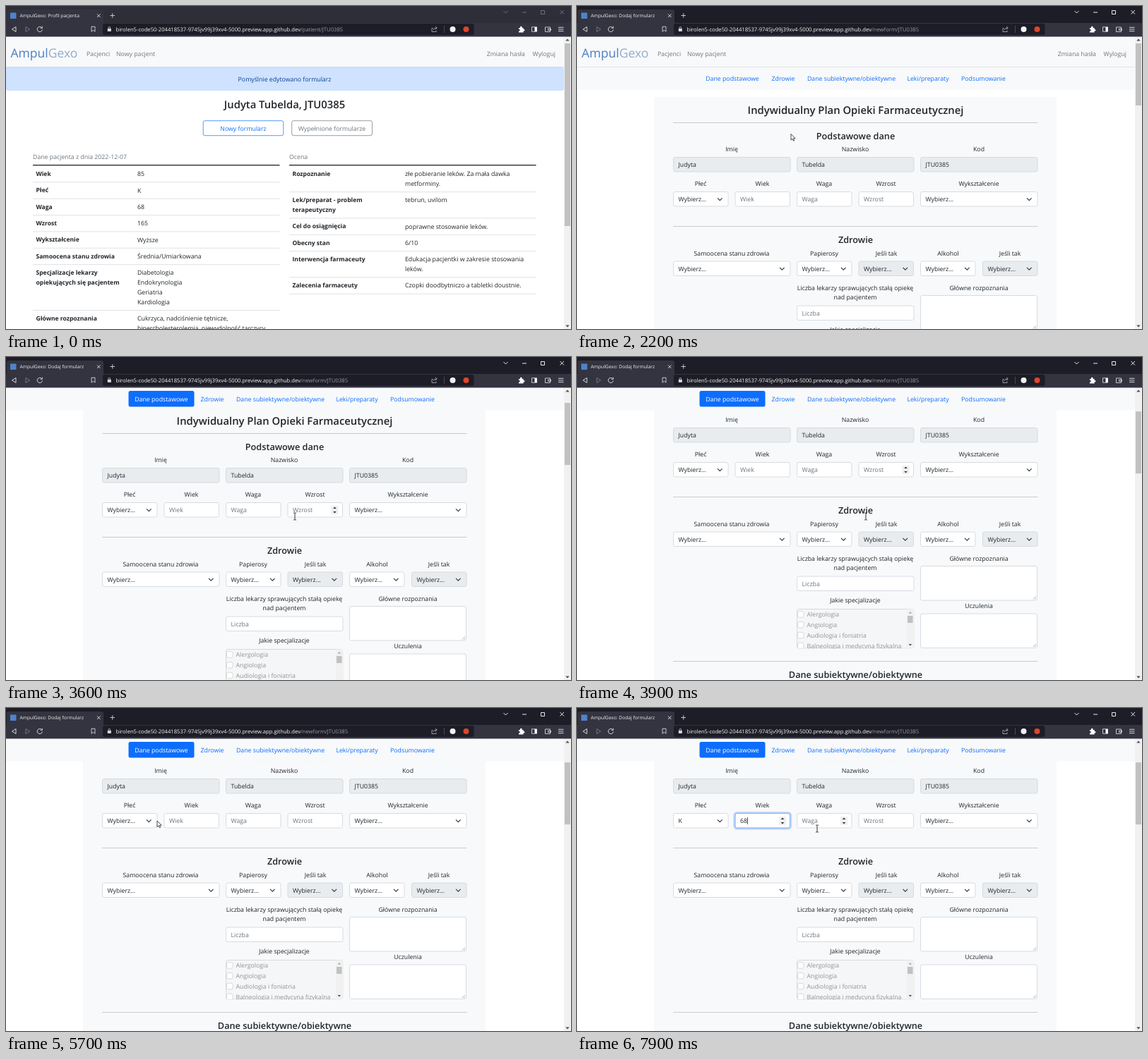
Animation, 800 px wide and 458 px high, one loop 8000 ms. Source, as an HTML page:

```html
<!DOCTYPE html>
<html lang="pl">
<head>
<meta charset="utf-8">
<title>AmpulGexo</title>
<style>
  html, body { margin: 0; width: 100%; height: 100%; overflow: hidden; background: #fff; }
  svg { display: block; }
  text { font-family: "Open Sans", "Noto Sans", sans-serif; text-rendering: geometricPrecision; white-space: pre; }
</style>
</head>
<body>
<svg id="stage" width="800" height="458" viewBox="0 0 800 458"></svg>
<script>
const INK = '#212529', MUTED = '#6c757d', BLUE = '#0d6efd', LINE = '#ced4da', LIGHT = '#f8f9fa';
const CODE = 'JTU0385', FIRST = 'Judyta', LAST = 'Tubelda';

// ---- drawing helpers; text is placed by its vertical middle ----
const text = (x, y, s, { size = 8.75, fill = INK, weight = 400, anchor = 'start', id = '' } = {}) =>
  `<text id="${id}" x="${x}" y="${y + size * .36}" font-size="${size}" fill="${fill}" font-weight="${weight}" text-anchor="${anchor}">${s}</text>`;
const mid = (x, y, s, o) => text(x, y, s, { anchor: 'middle', ...o });
const bold = (x, y, s) => text(x, y, s, { size: 8.55, weight: 700 });
const heading = (y, s, size = 12.7) => mid(394.5, y, s, { size, weight: 600 });
const rect = (x, y, w, h, fill, extra = '') => `<rect x="${x}" y="${y}" width="${w}" height="${h}" fill="${fill}" ${extra}/>`;
const path = (d, stroke, width = 1, fill = 'none', extra = '') =>
  `<path d="${d}" stroke="${stroke}" stroke-width="${width}" fill="${fill}" ${extra}/>`;
const rule = (x, y, w, color = '#dee2e6', h = 1) => rect(x, y, w, h, color);
const group = (id, body, extra = '') => `<g id="${id}" ${extra}>${body}</g>`;

const box = (x, y, w, h = 21.5, fill = '#fff') =>
  rect(x + .5, y + .5, w - 1, h - 1, fill, `stroke="${LINE}" stroke-width=".8" rx="2.5"`);
const input = (x, y, w, label, { fill, color = MUTED, id } = {}) =>
  box(x, y, w, 21.5, fill) + text(x + 7.5, y + 11, label, { fill: color, id });
const select = (x, y, w, { off, id } = {}) =>
  input(x, y, w, 'Wybierz...', { fill: off && '#e9ecef', color: INK, id }) +
  path(`M${x + w - 15.5} ${y + 9.3}l3.3 3.3 3.3-3.3`, '#343a40', 1.2);
const area = (x, y, h) => box(x, y, 166, h) +
  path(`M${x + 160} ${y + h - 2}l4-4M${x + 162.5} ${y + h - 2}l1.5-1.5`, '#777', .6);
const spinner = (id, x, y) => group(id, rect(x - 5, y - 6, 10, 12, '#efefef') +
  path(`M${x - 2.3} ${y - 2}l2.3-2.6 2.3 2.6zM${x - 2.3} ${y + 2}l2.3 2.6 2.3-2.6z`, 'none', 0, '#333'));
const ring = (id, x, y, w) => group(id,
  rect(x - .8, y - .8, w + 1.6, 23.1, 'none', `stroke="${BLUE}" stroke-opacity=".25" stroke-width="2.6" rx="4"`) +
  rect(x + .5, y + .5, w - 1, 20.5, 'none', 'stroke="#86b7fe" rx="2.5"'));

// ---- browser window ----
function browser() {
  const pale = '#d6d6dc';
  return rect(0, 0, 800, 24, '#1c1d26', 'id="frame"') + rect(0, 24, 800, 19.5, '#33343f') +
    path('M1 24V8q0-3 3-3H135q3 0 3 3V24z', 'none', 0, '#33343f') +
    rect(6, 9.5, 8.5, 8.5, '#4f83cc') +
    text(19.5, 13.8, '', { size: 6.7, fill: '#f0f0f2', id: 'title' }) +
    path('M129 11.5l4.5 4.5m0-4.5l-4.5 4.5', '#e4e4e8', .9) +
    path('M147.5 13.5h6.5m-3.25-3.25v6.5', pale, .9) +
    group('controls', path('M704.5 7l3 3 3-3M731 9h6M757.5 6.5h5v5h-5zM784.5 6l5.5 5.5m0-5.5l-5.5 5.5', '#fff', .9)) +
    path('M14 29.5v7l-5.5-3.5z', pale, 1) + path('M28 29.5v7l5.5-3.5z', '#74757f', 1) +
    path('M50.5 30.6a3.6 3.6 0 1 0 .9 3M51.3 28.8v2.6h-2.6', pale, 1) +
    path('M121 29.3h5v7l-2.5-2-2.5 2z', pale, .9) +
    rect(137, 25, 525.5, 16, '#1c1d26', 'rx="2.5"') +
    rect(143.8, 32, 5, 4, pale) + path('M145 32v-1.2a1.3 1.3 0 0 1 2.6 0V32', pale, .8) +
    `<text x="155.5" y="35.8" font-size="7.65" fill="#f4f4f6">birolen5-code50-204418537-9745jv99j39xv4-5000.preview.app.github.dev<tspan id="route" fill="#9a9ba5"></tspan></text>` +
    path('M604.5 31.5h-1.5v5h6v-2M605 34q.5-3 5-3m-2-2l2.3 2-2.3 2', '#b9bac2', .8) +
    rect(620, 28, .8, 10, '#55565f') +
    '<circle cx="632.5" cy="33" r="4" fill="#f2f2f4"/><circle cx="651.5" cy="33" r="4" fill="#e0452b"/>' +
    path('M726 31h2v-1a1.3 1.3 0 0 1 2.6 0v1h2v2h.6a1.3 1.3 0 0 1 0 2.6h-.6V37.5H726v-2h.6a1.2 1.2 0 0 0 0-2.4H726z', 'none', 0, '#fff') +
    path('M744.5 29.8h7v6.5h-7z', pale, .9) + rect(748.5, 30, 3, 6, '#fff') +
    path('M763.5 30h7v6.5h-7zM767.5 32.2h4v2.2h-4z', pale, .9) +
    path('M782 30.3h7.5m-7.5 2.7h7.5m-7.5 2.7h7.5', pale, 1);
}

const scrollbar = () => rect(790, 43.5, 10, 415, '#f1f1f1') +
  path('M792.3 49.5l2.7-3 2.7 3zM792.3 452.5l2.7 3 2.7-3z', 'none', 0, '#505050') +
  rect(791, 53, 8, 88, '#c1c1c1', 'id="thumb"');

function navbar() {
  const fill = '#737577';
  return rect(0, 43, 790, 43, LIGHT) + rule(0, 86, 790, '#e3e5e7') +
    `<text x="6.5" y="73" font-size="17.5" fill="#4d7fc4">Ampul<tspan fill="#93abce">Gexo</tspan></text>` +
    text(114, 68, 'Pacjenci', { fill }) + text(156, 68, 'Nowy pacjent', { fill }) +
    text(735, 68, 'Zmiana hasła', { fill, anchor: 'end' }) + text(778, 68, 'Wyloguj', { fill, anchor: 'end' });
}

// ---- patient profile ----
function table(x, valueX, caption, rows) {
  let y = 226, out = text(x, 214, caption, { fill: MUTED }) + rule(x, 225, 349.5, INK, 1.3);
  for (const [name, value] of rows) {
    const names = name.split('|'), values = value.split('|');
    names.forEach((s, i) => out += bold(x + 4.5, y + 12 + i * 13.9, s));
    values.forEach((s, i) => out += text(valueX, y + 12 + i * 13.9, s));
    y += 9.5 + 13.85 * Math.max(names.length, values.length);
    out += rule(x, y, 349.5);
  }
  return out;
}

const profile = () => rect(0, 43, 790, 415, '#fff') + navbar() +
  rect(.3, 86.8, 789.2, 32.7, '#cfe2ff', 'stroke="#b6d4fe" stroke-width=".6" rx="2.5"') +
  mid(394.5, 103.5, 'Pomyślnie edytowano formularz', { fill: '#084298' }) +
  heading(139.5, `${FIRST} ${LAST}, ${CODE}`, 14.8) +
  rect(279.2, 162.7, 113.6, 21, '#fff', `id="newButton" stroke="${BLUE}" stroke-width=".7" rx="2.5"`) +
  mid(336, 173.5, 'Nowy formularz', { id: 'newLabel' }) +
  rect(404.7, 162.7, 113.8, 21, '#fff', `stroke="${MUTED}" stroke-width=".7" rx="2.5"`) +
  mid(461.5, 173.5, 'Wypełnione formularze', { fill: MUTED }) +
  table(38, 186, 'Dane pacjenta z dnia 2022-12-07', [
    ['Wiek', '85'], ['Płeć', 'K'], ['Waga', '68'], ['Wzrost', '165'], ['Wykształcenie', 'Wyższe'],
    ['Samoocena stanu zdrowia', 'Średnia/Umiarkowana'],
    ['Specjalizacje lekarzy|opiekujących się pacjentem', 'Diabetologia|Endokrynologia|Geriatria|Kardiologia'],
    ['Główne rozpoznania', 'Cukrzyca, nadciśnienie tętnicze,|hipercholesterolemia, niewydolność tarczycy'],
  ]) +
  table(401, 565, 'Ocena', [
    ['Rozpoznanie', 'złe pobieranie leków. Za mała dawka|metforminy.'],
    ['Lek/preparat - problem|terapeutyczny', 'tebrun, uvilom'],
    ['Cel do osiągnięcia', 'poprawne stosowanie leków.'],
    ['Obecny stan', '6/10'],
    ['Interwencja farmaceuty', 'Edukacja pacjentki w zakresie stosowania|leków.'],
    ['Zalecenia farmaceuty', 'Czopki doodbytniczo a tabletki doustnie.'],
  ]);

// ---- new form ----
const labels = (y, list) => list.map(([x, s]) => mid(x, y, s)).join('');

function form() {
  const fixed = { fill: '#e9ecef', color: INK };
  const specialties = ['Alergologia', 'Angiologia', 'Audiologia i foniatria', 'Balneologia i medycyna fizykalna']
    .map((s, i) => {
      const y = 479 + i * 14.8;
      return rect(312.5, y - 4.3, 8.5, 8.5, '#fff', 'stroke="#d3d6d9" stroke-width=".9" rx="2"') +
        text(325.5, y, s, { fill: '#909396' });
    }).join('');
  return rect(109, 129, 570, 600, LIGHT) +
    heading(147.5, 'Indywidualny Plan Opieki Farmaceutycznej', 14.8) + rule(136, 165, 516.5, '#c9cbcd') +
    heading(184.5, 'Podstawowe dane') +
    labels(203, [[219, 'Imię'], [394, 'Nazwisko'], [569, 'Kod']]) +
    input(136, 214, 166.5, FIRST, fixed) + input(311, 214, 166.5, LAST, fixed) + input(486, 214, 166.5, CODE, fixed) +
    labels(252, [[175, 'Płeć'], [262.5, 'Wiek'], [350, 'Waga'], [437.5, 'Wzrost'], [569, 'Wykształcenie']]) +
    select(136, 263, 78.5, { id: 'sex' }) + input(223.5, 263, 78.5, 'Wiek', { id: 'age' }) +
    input(311, 263, 78.5, 'Waga') + input(398.5, 263, 78.5, 'Wzrost') + select(486, 263, 166.5) +
    ring('sexRing', 136, 263, 78.5) + ring('ageRing', 223.5, 263, 78.5) + rect(0, 269, .8, 10, INK, 'id="caret"') +
    spinner('ageSpin', 291, 274) + spinner('weightSpin', 378, 274) + spinner('heightSpin', 465.5, 274) +
    rule(136, 312, 516.5, '#c9cbcd') + heading(331, 'Zdrowie') +
    labels(350.5, [[219, 'Samoocena stanu zdrowia'], [350, 'Papierosy'], [438, 'Jeśli tak'], [525.5, 'Alkohol'], [613, 'Jeśli tak']]) +
    select(136, 361.5, 166.5) + select(311, 361.5, 78.5) + select(398.5, 361.5, 78.5, { off: true }) +
    select(486, 361.5, 78.5) + select(574, 361.5, 78.5, { off: true }) +
    labels(399.5, [[394, 'Liczba lekarzy sprawujących stałą opiekę'], [569, 'Główne rozpoznania']]) +
    mid(394, 413, 'nad pacjentem') + input(311, 424.5, 166.5, 'Liczba') + area(486, 410, 49.5) +
    mid(394, 458.5, 'Jakie specjalizacje') + mid(569, 467, 'Uczulenia') + area(486, 477.5, 49.5) +
    `<svg x="311" y="471" width="166.5" height="56.5" viewBox="311 471 166.5 56.5">` +
    box(311, 471, 166.5, 56.5, '#f5f6f7') + specialties + rect(467, 471.5, 10, 55.5, '#f1f1f1') +
    rect(468, 481, 7.5, 10, '#c1c1c1') +
    path('M469.7 477.5l2.2-2.5 2.2 2.5z', 'none', 0, '#a3a3a3') +
    path('M469.7 521l2.2 2.5 2.2-2.5z', 'none', 0, '#505050') + '</svg>' +
    rule(136, 545, 516.5, '#c9cbcd') + heading(564, 'Dane subiektywne/obiektywne') +
    labels(587.5, [[219, 'Schorzenia oraz dolegliwości pacjenta –']]) +
    mid(219, 601.3, 'o charakterze ostrym i przewlekłym,') + mid(219, 615, 'zarówno aktualne, jak i przeszłe') +
    area(311, 580.5, 60) + area(486, 580.5, 60) +
    text(318.5, 592, 'Dane subiektywne', { fill: MUTED }) + text(493.5, 592, 'Dane obiektywne', { fill: MUTED });
}

const subnav = () => rect(0, 87, 790, 32, LIGHT) +
  rect(173.5, 91.5, 93, 22.5, BLUE, 'id="pill" rx="2.5"') +
  [[220, 'Dane podstawowe'], [292, 'Zdrowie'], [388.5, 'Dane subiektywne/obiektywne'], [497, 'Leki/preparaty'], [575.5, 'Podsumowanie']]
    .map(([x, s], i) => mid(x, 103, s, { fill: BLUE, id: i ? '' : 'firstLink' })).join('');

const pointers = () =>
  group('arrow', path('M0 0v8.6l2-1.8 1.4 3 1.4-.6-1.4-3h2.7z', '#222', .8, '#fff')) +
  group('hand', path('M-1 .8q1-1.4 2 0v4l4 .8q1.2.4 1 2l-.8 4.6h-5.8l-3.2-4.2q-.2-1.6 1.2-1.2l1.6 1.2z', '#222', .9, '#fff')) +
  group('ibeam', path('M-2-5h1.5l.5.5.5-.5H2M-2 5h1.5l.5-.5.5.5H2M0-4.5v9', '#222', .9));

stage.innerHTML =
  group('profilePage', profile()) +
  group('formPage', rect(0, 43, 790, 415, '#fff') +
    group('scroller', navbar() + form()) + group('sticky', subnav())) +
  scrollbar() + browser() + group('pointer', pointers());

// ---- motion ----
const CURSOR = [[300, 806, 386], [1500, 303, 182], [2900, 303, 181], [3400, 409, 226], [3950, 409, 226],
  [4300, 491, 235], [4800, 491, 235], [5600, 214, 160], [5750, 214, 160], [6000, 190, 163], [6300, 175, 184],
  [6450, 175, 184], [6850, 250, 162], [7500, 255, 165], [7900, 340, 171]];
const SCROLL = [[3250, 0], [3400, 57], [3720, 57], [3880, 114], [4050, 114], [4200, 171], [4900, 171], [5050, 114]];

function follow(keys, t) {
  const i = keys.findIndex(k => k[0] > t);
  if (i < 0) return keys.at(-1).slice(1);
  if (i === 0) return keys[0].slice(1);
  const [a, b] = [keys[i - 1], keys[i]];
  const p = (t - a[0]) / (b[0] - a[0]), e = p * p * (3 - 2 * p);
  return a.slice(1).map((v, j) => v + (b[j + 1] - v) * e);
}

const $ = id => document.getElementById(id);
const show = (id, on) => $(id).setAttribute('visibility', on ? 'inherit' : 'hidden');
const set = (id, attrs) => Object.entries(attrs).forEach(([k, v]) => $(id).setAttribute(k, v));
const write = (id, s) => { if ($(id).textContent !== s) $(id).textContent = s; };
const within = (t, a, b = Infinity) => t >= a && t < b;

function draw(t) {
  const onForm = t >= 2100, focused = t >= 1900;
  const [x, y] = follow(CURSOR, t), [scroll] = follow(SCROLL, t);

  show('profilePage', !onForm);
  show('formPage', onForm);
  write('title', 'AmpulGexo: ' + (onForm ? 'Dodaj formularz' : 'Profil pacjenta'));
  write('route', (onForm ? '/newform/' : '/patient/') + CODE);
  set('frame', { fill: focused ? '#1c1d26' : '#2d2e37' });
  set('controls', { opacity: focused ? 1 : .35 });
  set('thumb', onForm ? { y: 53 + scroll * .212, height: 88 } : { y: 53, height: 259 });

  const hover = !onForm && x > 279 && x < 393 && y > 162 && y < 184;
  set('newButton', { fill: hover ? BLUE : '#fff' });
  set('newLabel', { fill: hover ? '#fff' : BLUE });

  set('scroller', { transform: `translate(0 ${-scroll})` });
  set('sticky', { transform: `translate(0 ${-Math.min(scroll, 43.5)})` });
  show('pill', scroll > 20);
  set('firstLink', { fill: scroll > 20 ? '#fff' : BLUE });

  const age = '68'.slice(0, t < 7200 ? 0 : t < 7400 ? 1 : 2);
  write('sex', t < 6400 ? 'Wybierz...' : 'K');
  write('age', age || 'Wiek');
  set('age', { fill: age ? INK : MUTED });
  set('caret', { x: 231.2 + age.length * 5 });
  show('sexRing', within(t, 6000, 6850));
  for (const id of ['ageRing', 'caret']) show(id, t >= 6850);
  show('ageSpin', t >= 6750);
  show('weightSpin', t >= 7780);
  show('heightSpin', within(t, 3400, 4000));

  const beam = within(t, 3250, 4000) || t >= 6750;
  show('pointer', t >= 300);
  set('pointer', { transform: `translate(${x} ${y})` });
  show('hand', hover);
  show('ibeam', beam);
  show('arrow', !hover && !beam);
}

function tick() {
  draw(performance.now() % 8000);
  requestAnimationFrame(tick);
}
tick();
</script>
</body>
</html>
```
